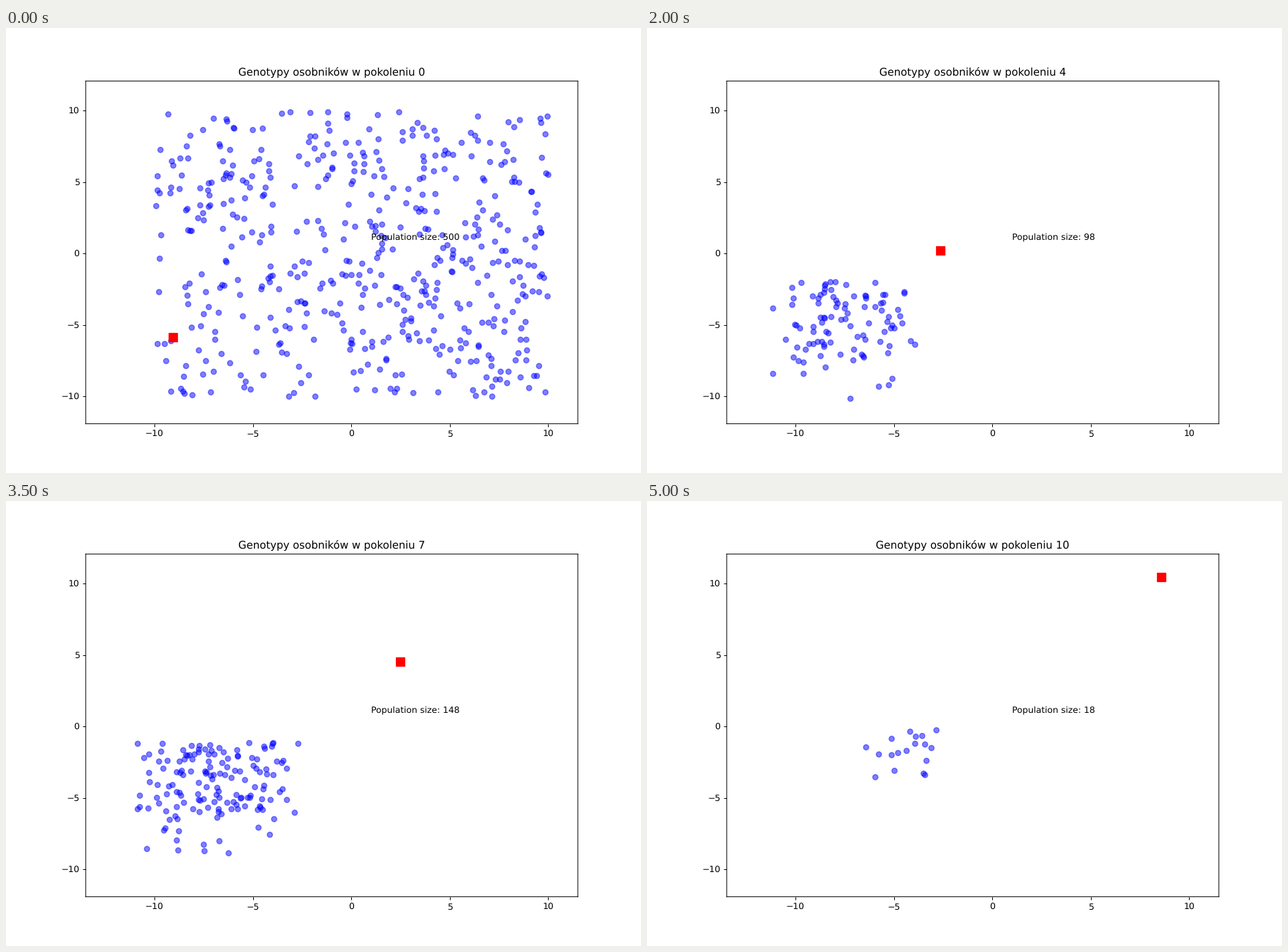
Animation of 894 by 626 pixels, one loop 5.5 s. Source, as a matplotlib script:

```python
import matplotlib.pyplot as plt
import numpy as np
from matplotlib.animation import FuncAnimation

DPI = 89.4
STEP_MS = 500
SIZES = [500, 36, 59, 82, 98, 128, 146, 148, 140, 76, 18]

# Key points over the generations; values in between are interpolated.
OPTIMUM = {0: (-9.07, -5.87), 1: (-8.95, -5.72), 3: (-3.82, -1.0),
           5: (-1.46, 1.36), 6: (1.3, 3.16), 8: (3.67, 5.87),
           10: (8.58, 10.48)}
# Extent of the population: left, bottom, right, top.
EXTENT = {1: (-10.48, -9.44, -5.84, -2.62), 5: (-11.4, -10.4, -3.33, -1.8),
          8: (-10.6, -8.1, -2.4, -0.8), 10: (-6.42, -3.54, -2.88, -0.25)}


def at(keys, gen):
    """Interpolate each component of the key points at one generation."""
    return np.array([np.interp(gen, list(keys), part)
                     for part in zip(*keys.values())])


def population(gen):
    """Uniform at first, then a cloud that fills its extent."""
    rng = np.random.default_rng(gen)
    size = SIZES[gen]
    if gen == 0:
        return rng.uniform(-10, 10, (size, 2))
    pts = np.column_stack([rng.beta(2.1, 2.0, size), rng.beta(2.0, 1.2, size)])
    pts = (pts - pts.min(axis=0)) / np.ptp(pts, axis=0)
    low, high = at(EXTENT, gen).reshape(2, 2)
    return low + pts * (high - low)


plt.rcParams["text.hinting"] = "none"
fig, ax = plt.subplots(figsize=(894.001 / DPI, 626.001 / DPI), dpi=DPI)
fig.subplots_adjust(left=0.1255, right=0.9005, bottom=0.1107, top=0.8807)
ax.spines[:].set_snap(False)
ax.set_xlim(-13.5, 11.5)
ax.set_ylim(-11.93, 12.07)
ax.set_xticks(range(-10, 11, 5))
ax.set_yticks(range(-10, 11, 5))

dots = ax.scatter([], [], color="blue", alpha=0.5)
optimum = ax.scatter([], [], color="red", marker="s", s=100)
label = ax.text(1, 1, "")
title = ax.set_title("")


def draw(gen):
    dots.set_offsets(population(gen))
    optimum.set_offsets([at(OPTIMUM, gen)])
    label.set_text(f"Population size: {SIZES[gen]}")
    title.set_text(f"Genotypy osobników w pokoleniu {gen}")
    return dots, optimum, label, title


anim = FuncAnimation(fig, draw, frames=len(SIZES), interval=STEP_MS,
                     init_func=lambda: draw(0), repeat=True, repeat_delay=0)
plt.show()
```
